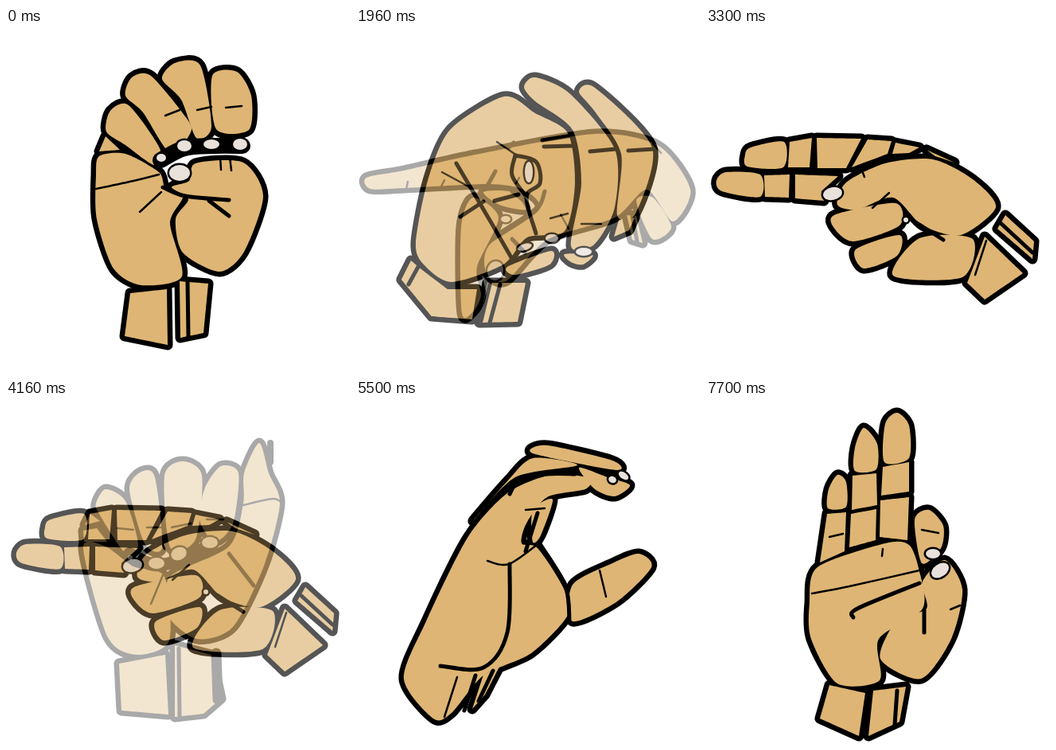
Recreate the animation shown at these times as an HTML page with a canvas. Size 432 by 432 pixels, loop 8000 ms.

```html
<!DOCTYPE html>
<html lang="en">
<head>
<meta charset="utf-8">
<title>Hand signs</title>
<style>
html, body { margin: 0; width: 100%; height: 100%; overflow: hidden; background: #fff; }
canvas { display: block; width: 100vw; height: 100vh; }
</style>
</head>
<body>
<canvas id="stage" width="432" height="432"></canvas>
<script>
const SIZE = 432, LOOP = 8000, PERIOD = 1100, HOLD = 800, STEP = 60, STEPS = 6;
const SKIN = '#deb574', NAIL = '#e9e2dc', INK = '#000', PAPER = '#fff', OUTLINE = 13;

// Curve through the points; ease 0 gives straight sides.
function trace(ctx, xy, closed, ease) {
  const n = xy.length / 2, k = ease / 6;
  const at = i => {
    i = closed ? (i + n) % n : Math.min(Math.max(i, 0), n - 1);
    return [xy[2 * i], xy[2 * i + 1]];
  };
  ctx.beginPath();
  ctx.moveTo(...at(0));
  for (let i = 0; i < (closed ? n : n - 1); i++) {
    const [a, b, c, d] = [at(i - 1), at(i), at(i + 1), at(i + 2)];
    ctx.bezierCurveTo(
      b[0] + (c[0] - a[0]) * k, b[1] + (c[1] - a[1]) * k,
      c[0] - (d[0] - b[0]) * k, c[1] - (d[1] - b[1]) * k, c[0], c[1]);
  }
  if (closed) ctx.closePath();
}

// The first pass lays the black outline, the second the skin and details.
function makePen(ctx, outline) {
  const patch = (xy, ease) => {
    trace(ctx, xy, true, ease);
    ctx.lineWidth = OUTLINE;
    if (outline) { ctx.stroke(); ctx.fillStyle = INK; }
    else ctx.fillStyle = SKIN;
    ctx.fill();
  };
  const ink = (width, ...xy) => {
    if (outline) return;
    trace(ctx, xy, false, 1);
    ctx.lineWidth = width;
    ctx.stroke();
  };
  return {
    skin: (...xy) => patch(xy, 0.8),
    block: (...xy) => patch(xy, 0),
    ink,
    thin: (...xy) => ink(2.5, ...xy),
    bold: (...xy) => ink(5, ...xy),
    nail(x, y, rx, ry, tilt = 0, color = NAIL) {
      if (outline) return;
      ctx.beginPath();
      ctx.ellipse(x, y, rx, ry, tilt, 0, 2 * Math.PI);
      ctx.lineWidth = 5;
      ctx.stroke();
      ctx.fillStyle = color;
      ctx.fill();
    }
  };
}

function signE({ skin, block, ink, thin, bold, nail }) {
  skin(113, 185, 117, 161, 150, 158, 192, 181, 200, 201, 222, 212, 206, 245, 221, 312, 170, 323, 135, 302, 114, 240);
  skin(126, 130, 131, 104, 154, 97, 193, 151, 186, 172, 150, 147);
  block(117, 155, 125, 136, 143, 153);
  skin(150, 85, 158, 62, 182, 60, 228, 115, 231, 133, 206, 157, 172, 106);
  skin(196, 64, 212, 44, 244, 47, 258, 124, 239, 138, 220, 90);
  skin(259, 60, 290, 55, 308, 85, 305, 128, 264, 127);
  skin(238, 170, 298, 169, 323, 211, 299, 281, 268, 306, 222, 282, 213, 240, 229, 215, 208, 200, 230, 192);
  block(156, 333, 202, 328, 203, 398, 149, 387);
  block(218, 318, 254, 321, 248, 383, 219, 389);
  bold(228, 318, 229, 388);
  ink(20, 194, 166, 224, 151, 262, 148, 297, 148);
  nail(195, 163, 6, 5);
  nail(224, 148, 9, 7);
  nail(258, 146, 10, 6);
  nail(294, 146, 9, 7);
  nail(218, 182, 13, 10);
  thin(113, 202, 160, 192, 192, 184);
  bold(197, 200, 225, 211, 280, 216);
  thin(195, 206, 168, 231);
  bold(255, 217, 280, 236);
  thin(200, 110, 218, 103);
  thin(240, 103, 258, 99);
  thin(276, 100, 296, 98);
  thin(269, 162, 270, 178);
  thin(281, 162, 283, 179);
}

function signM({ skin, block, thin, bold, nail }) {
  skin(75, 270, 90, 192, 118, 128, 186, 86, 225, 107, 266, 132, 275, 195, 262, 255, 215, 263, 185, 297, 120, 319, 85, 297);
  skin(211, 74, 225, 62, 268, 82, 325, 152, 325, 225, 299, 272, 270, 274, 283, 195, 272, 128, 225, 92);
  skin(280, 80, 300, 75, 372, 150, 351, 233, 328, 235, 333, 158, 300, 105);
  block(330, 241, 350, 238, 343, 254, 324, 262);
  skin(262, 284, 297, 285, 285, 297, 270, 294);
  skin(190, 300, 245, 280, 243, 297, 200, 310);
  block(57, 316, 69, 292, 82, 303, 115, 328, 152, 328, 146, 366, 95, 362);
  block(165, 320, 213, 320, 203, 369, 155, 370);
  bold(78, 300, 66, 322);
  bold(168, 322, 157, 368);
  bold(181, 322, 168, 370);
  bold(200, 160, 196, 185, 214, 212);
  bold(200, 160, 226, 168, 231, 195, 214, 212, 226, 258);
  nail(217, 181, 5, 13);
  nail(212, 275, 9, 4, -0.3);
  nail(246, 264, 8, 5);
  nail(286, 281, 10, 5);
  bold(126, 170, 166, 238, 196, 290);
  thin(108, 181, 143, 200);
  bold(131, 237, 160, 218);
  bold(174, 217, 204, 209);
  bold(234, 141, 271, 135);
  bold(236, 149, 271, 148);
  bold(294, 155, 326, 152);
  bold(342, 154, 374, 152);
  thin(177, 143, 202, 160);
  thin(244, 239, 266, 233);
  thin(283, 246, 308, 246);
}

function signP({ skin, block, thin, bold, nail }) {
  skin(13, 188, 60, 179, 150, 159, 300, 133, 380, 148, 420, 203, 398, 243, 365, 203, 325, 238, 240, 266, 188, 318, 163, 305, 168, 272, 230, 228, 210, 203, 165, 196, 60, 201, 18, 202);
  skin(147, 213, 179, 238, 152, 300, 157, 335, 148, 355, 133, 358, 132, 250);
  skin(160, 206, 195, 206, 213, 228, 180, 222);
  skin(352, 217, 373, 213, 396, 250, 372, 265);
  block(340, 235, 352, 236, 360, 270, 347, 266);
  bold(347, 236, 353, 268);
  nail(175, 305, 10, 12, 0.2);
  nail(188, 240, 6, 4, 0, PAPER);
  bold(165, 198, 175, 180);
  bold(196, 265, 212, 282);
  bold(237, 205, 225, 230, 172, 265);
  thin(195, 206, 212, 219);
  thin(257, 234, 267, 252);
  thin(373, 145, 383, 157);
  thin(201, 195, 205, 188);
  thin(63, 203, 65, 193);
  thin(106, 201, 111, 191);
  bold(192, 150, 198, 144);
}

function signH({ skin, block, thin, bold, nail }) {
  skin(49, 160, 56, 150, 98, 143, 97, 175, 52, 174);
  block(105, 143, 133, 138, 130, 175, 103, 175);
  block(139, 138, 195, 139, 176, 176, 140, 176);
  block(203, 140, 233, 142, 228, 158, 183, 175);
  block(238, 144, 268, 150, 255, 157, 234, 158);
  block(277, 153, 312, 169, 288, 161);
  skin(13, 192, 25, 181, 68, 184, 68, 212, 20, 205);
  block(73, 185, 105, 184, 104, 213, 74, 212);
  block(112, 184, 166, 186, 145, 205, 148, 217, 112, 214);
  skin(176, 194, 225, 170, 285, 165, 335, 190, 364, 225, 320, 260, 272, 248, 235, 213, 190, 228, 165, 222);
  skin(163, 234, 238, 220, 243, 248, 185, 268, 160, 250);
  skin(188, 278, 243, 260, 240, 286, 198, 302);
  skin(268, 264, 335, 265, 322, 313, 235, 311);
  block(350, 262, 398, 308, 350, 341, 328, 320);
  block(376, 235, 412, 268, 410, 290, 366, 252);
  nail(159, 208, 12, 8, -0.2);
  nail(251, 241, 3, 3);
  thin(230, 207, 209, 226);
  bold(265, 245, 298, 266);
  thin(194, 174, 199, 187);
  thin(352, 267, 338, 310);
  bold(370, 245, 410, 282);
}

function signA({ skin, block, ink, thin, bold, nail }) {
  skin(113, 130, 125, 112, 150, 127, 166, 182, 148, 190, 117, 143);
  block(98, 178, 97, 164, 114, 161, 127, 178);
  block(99, 157, 106, 143, 118, 152);
  skin(155, 112, 170, 90, 187, 97, 196, 185, 174, 180);
  skin(199, 95, 222, 77, 246, 95, 238, 175, 206, 185);
  skin(250, 110, 270, 83, 292, 92, 285, 155, 262, 178, 243, 150);
  skin(299, 92, 318, 54, 330, 92, 344, 130, 324, 208, 285, 285, 240, 300, 203, 270, 206, 222, 280, 184, 298, 130);
  skin(97, 186, 125, 184, 160, 209, 199, 222, 205, 302, 165, 320, 128, 298);
  block(142, 331, 200, 320, 204, 395, 145, 390);
  block(212, 308, 258, 320, 270, 375, 248, 394, 212, 398);
  ink(16, 155, 193, 186, 207, 222, 200, 260, 180);
  ink(13, 264, 318, 266, 376);
  nail(189, 205, 10, 7);
  nail(217, 193, 10, 8, -0.4);
  nail(256, 179, 10, 7);
  nail(156, 198, 3, 3);
  ink(8, 332, 54, 332, 78);
  thin(298, 132, 335, 124, 347, 130);
  bold(280, 193, 311, 233);
  thin(197, 220, 182, 256);
  thin(140, 161, 160, 163);
  thin(177, 160, 197, 160);
  thin(208, 160, 232, 155);
  thin(252, 150, 273, 150);
  bold(217, 312, 218, 397);
}

function signC({ skin, block, thin, bold, nail }) {
  skin(60, 350, 88, 278, 140, 173, 190, 117, 245, 94, 293, 98, 288, 112, 240, 122, 214, 155, 208, 180, 228, 186, 260, 235, 266, 270, 220, 318, 160, 346, 120, 393, 97, 400);
  skin(147, 152, 190, 102, 222, 73, 278, 82, 200, 97);
  skin(222, 67, 240, 57, 322, 76, 326, 88);
  skin(280, 85, 316, 97, 344, 107, 325, 121, 300, 112);
  skin(222, 138, 247, 125, 232, 170, 222, 178);
  skin(272, 232, 322, 205, 355, 193, 371, 210, 328, 253, 272, 278);
  block(160, 345, 180, 335, 162, 370, 146, 388);
  nail(336, 95, 7, 4, 0.6);
  nail(322, 100, 5, 4, 0.4);
  bold(193, 118, 205, 101, 240, 93, 275, 93);
  bold(213, 190, 228, 142);
  thin(237, 136, 213, 138);
  thin(232, 178, 192, 206, 165, 202);
  bold(193, 206, 190, 292, 160, 336, 106, 334);
  bold(232, 182, 263, 234, 268, 278);
  thin(306, 214, 314, 247);
  thin(111, 398, 127, 348);
  bold(150, 346, 136, 390);
  bold(172, 340, 154, 378);
}

// Wrist and three raised fingers, shared by the open hands.
function openHand({ skin, block, thin, bold }) {
  skin(154, 112, 165, 94, 176, 103, 176, 134, 153, 136);
  block(152, 143, 176, 141, 174, 190, 143, 204);
  skin(187, 60, 198, 35, 215, 55, 214, 87, 187, 89);
  block(184, 95, 214, 92, 215, 132, 183, 138);
  block(182, 143, 214, 137, 213, 176, 180, 185);
  skin(225, 30, 240, 16, 255, 32, 255, 73, 224, 78);
  block(222, 84, 255, 78, 255, 115, 220, 120);
  block(219, 126, 255, 122, 253, 176, 218, 172);
  block(155, 358, 200, 368, 192, 422, 143, 400);
  block(210, 365, 251, 360, 243, 404, 204, 422);
  bold(240, 365, 237, 408);
  thin(155, 172, 172, 168);
}

function signF(pen) {
  const { skin, thin, bold, nail } = pen;
  openHand(pen);
  skin(262, 150, 280, 138, 298, 158, 295, 186, 271, 205);
  skin(140, 210, 225, 180, 255, 182, 268, 215, 272, 262, 217, 300, 218, 352, 165, 356, 132, 300, 130, 255);
  skin(272, 228, 300, 201, 322, 238, 308, 300, 270, 350, 219, 325, 240, 276, 277, 262);
  nail(285, 193, 9, 6);
  nail(294, 214, 12, 8, -0.6);
  thin(133, 243, 180, 234, 268, 214);
  bold(185, 273, 190, 262, 268, 230);
  thin(221, 196, 222, 187);
  thin(271, 163, 292, 167);
  bold(274, 264, 274, 292);
  thin(307, 263, 319, 258);
}

function signB(pen) {
  const { skin, block, thin, bold, nail } = pen;
  openHand(pen);
  skin(266, 75, 284, 53, 297, 64, 297, 98, 264, 100);
  block(263, 106, 297, 104, 295, 140, 261, 141);
  block(260, 147, 295, 146, 293, 184, 259, 180);
  skin(140, 210, 225, 180, 294, 191, 319, 262, 290, 327, 230, 354, 165, 356, 132, 300, 130, 255);
  bold(296, 222, 265, 236, 192, 228, 184, 256, 255, 278, 292, 300);
  nail(195, 244, 8, 9);
  thin(133, 222, 180, 212, 280, 208);
  bold(222, 350, 214, 325, 250, 278);
}

function paint(sign) {
  const sheet = document.createElement('canvas');
  sheet.width = sheet.height = SIZE;
  const ctx = sheet.getContext('2d');
  ctx.fillStyle = PAPER;
  ctx.fillRect(0, 0, SIZE, SIZE);
  if (sign === signB) ctx.setTransform(1, 0, 0, 0.96, 0, 13.4);
  ctx.strokeStyle = INK;
  ctx.lineCap = ctx.lineJoin = 'round';
  sign(makePen(ctx, true));
  sign(makePen(ctx, false));
  return sheet;
}

const sheets = [signE, signM, signP, signH, signA, signC, signB, signF].map(paint);
const view = document.getElementById('stage').getContext('2d');

function show(sheet, alpha) {
  view.globalAlpha = alpha;
  view.drawImage(sheet, 0, 0);
}

function frame(now) {
  const t = now % LOOP, i = Math.floor(t / PERIOD), local = t % PERIOD;
  show(sheets[i], 1);
  if (local >= HOLD && i + 1 < sheets.length) {
    const step = Math.floor((local - HOLD) / STEP) + 1;
    show(sheets[i + 1], Math.min(step / STEPS, 1));
  }
  requestAnimationFrame(frame);
}
requestAnimationFrame(frame);
</script>
</body>
</html>
```
